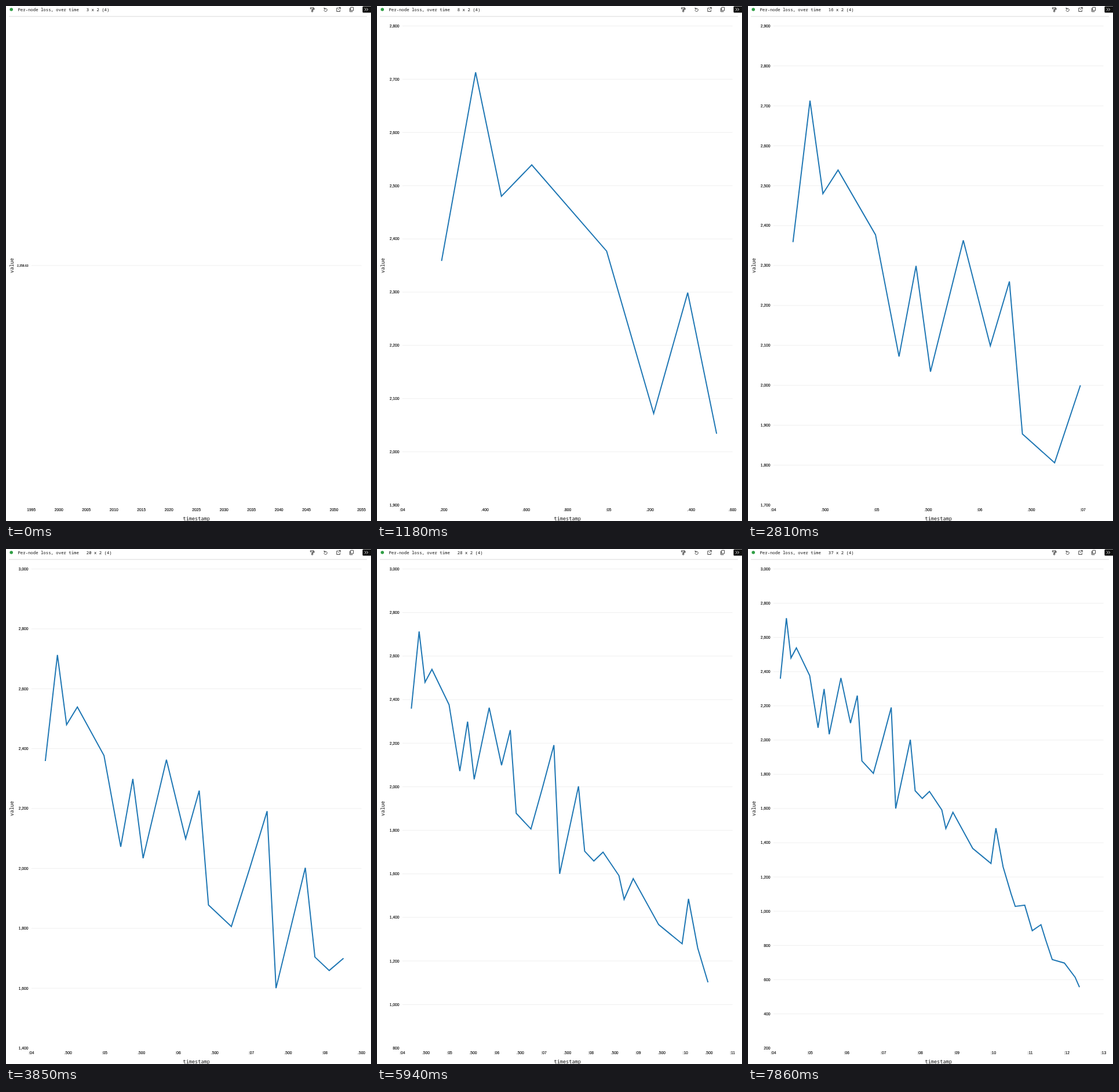
Recreate the animation shown at these times as an HTML page. Size 630x889 px, loop 8000 ms.

```html
<!DOCTYPE html>
<html lang="en">
<head>
<meta charset="utf-8">
<title>Per-node loss</title>
<style>
  html, body { margin: 0; width: 100%; height: 100%; overflow: hidden; background: #fff; }
  svg { display: block; }
  .mono { font-family: "Noto Sans Mono", "Liberation Mono", monospace; fill: #111; white-space: pre; }
  .tick { font: 6.7px "Liberation Sans", Arial, sans-serif; fill: #000; stroke: #000; stroke-width: .12; }
  .icon { fill: none; stroke: #222; stroke-width: .85; stroke-linejoin: round; stroke-linecap: round; }
</style>
</head>
<body>
<svg width="630" height="889" viewBox="0 0 630 889">
  <rect width="630" height="889" fill="#fff"/>
  <circle cx="9.2" cy="6" r="2.8" fill="#2f9e44"/>
  <text class="mono" font-size="7.33" x="20.4" y="8.8">Per-node loss, over time</text>
  <text class="mono" font-size="7.33" x="138.8" y="8.8" id="rows"></text>
  <path d="M5 18H623" stroke="#d9d9d9" stroke-width="1"/>
  <g class="icon">
    <path d="M525.8 2.8h5v2.2h-5zM530.8 3.8h1.2v2.4h-3.2v1.2M528 7.4h1.6v2.6h-1.6z"/>
    <path d="M549.2 3v2.2h2.2M549.4 5.1a2.7 2.7 0 1 1-.5 2.3"/>
    <path d="M573 3.6h-2.2v5.9h5.6v-2.3M574.4 2.5h2.8v2.8M577 2.7l-3.6 3.6"/>
    <path d="M595.2 2.3h4.4v5.6h-4.4zM593.4 4v5.8h4.6"/>
  </g>
  <path d="M630 .5H617a1.6 1.6 0 0 0-1.6 1.6v7.8a1.6 1.6 0 0 0 1.6 1.6H630z" fill="#111"/>
  <path d="M619 3.6l2.4 2.4-2.4 2.4M622.3 3.6l2.4 2.4-2.4 2.4" fill="none" stroke="#fff" stroke-width=".9"/>
  <g id="axes"></g>
  <path id="line" fill="none" stroke="#1f77b4" stroke-width="2"/>
  <text class="mono" font-size="8.6" text-anchor="middle" transform="translate(13.2 448) rotate(-90)">value</text>
  <text class="mono" font-size="8.6" text-anchor="middle" x="328.7" y="888">timestamp</text>
</svg>
<script>
const LOOP = 8;
const LEFT = 43.8, RIGHT = 613.6, TOP = 34.5, BOTTOM = 861.5;

// The stream runs LEAD seconds ahead; the chart redraws every REDRAW seconds.
const LEAD = .56, REDRAW = .31, FIRST = .045;

// seconds after :04, value
const data = [
  [.19, 2358.63], [.355, 2713], [.48, 2480], [.627, 2539], [.99, 2377],
  [1.218, 2072], [1.383, 2299], [1.523, 2034], [1.841, 2363], [2.103, 2099],
  [2.288, 2260], [2.414, 1878], [2.726, 1806], [2.976, 2000], [3.213, 2191],
  [3.335, 1600], [3.734, 2002], [3.865, 1704], [4.06, 1659], [4.255, 1700],
  [4.592, 1592], [4.702, 1483], [4.895, 1578], [5.434, 1367], [5.932, 1279],
  [6.067, 1485], [6.263, 1259], [6.48, 1102], [6.594, 1028], [6.853, 1035],
  [7.058, 886], [7.295, 921], [7.429, 829], [7.603, 717], [7.934, 697],
  [8.226, 614], [8.345, 556]
];

const rowsEl = document.getElementById("rows");
const axesEl = document.getElementById("axes");
const lineEl = document.getElementById("line");

const rowsAt = t => data.filter(p => p[0] <= t + LEAD).length;

function plottedAt(t) {
  const k = Math.floor((t - FIRST) / REDRAW);
  return k < 0 ? 1 : rowsAt(FIRST + k * REDRAW);
}

function niceStep(span, count) {
  const raw = span / count;
  const power = 10 ** Math.floor(Math.log10(raw));
  const e = raw / power;
  return power * (e >= Math.sqrt(50) ? 10 : e >= Math.sqrt(10) ? 5 : e >= Math.SQRT2 ? 2 : 1);
}

const widen = ([lo, hi], step) =>
  [Math.floor(lo / step + 1e-6) * step, Math.ceil(hi / step - 1e-6) * step];

function padded(values, part) {
  const lo = Math.min(...values), hi = Math.max(...values), pad = (hi - lo) * part;
  return [lo - pad, hi + pad];
}

function timeDomain(values) {
  const d = padded(values, .01);
  return widen(d, niceStep(d[1] - d[0], 9.3));
}

function valueDomain(values) {
  let d = padded(values, .1), last = 0;
  for (let i = 0; i < 10; i++) {
    const step = niceStep(d[1] - d[0], 10);
    if (step === last) break;
    d = widen(d, step);
    last = step;
  }
  return d;
}

function ticks([lo, hi]) {
  const step = niceStep(hi - lo, 10), out = [];
  for (let i = Math.ceil(lo / step - 1e-6); i * step <= hi + step * 1e-6; i++) out.push(i * step);
  return out;
}

const scale = ([lo, hi], a, b) => v => a + (v - lo) / (hi - lo) * (b - a);

function timeLabel(s) {
  const ms = Math.round(s * 1000), part = ms % 1000;
  return part ? "." + String(part).padStart(3, "0")
              : ":" + String(4 + ms / 1000).padStart(2, "0");
}

const valueLabel = v => String(Math.round(v)).replace(/\B(?=(\d{3})+$)/g, ",");

const xTick = (x, label) =>
  `<text class="tick" text-anchor="middle" x="${x}" y="872">${label}</text>`;

const yTick = (y, label, size = 6.7) =>
  (y < BOTTOM - 1 ? `<path d="M${LEFT} ${y}H${RIGHT}" stroke="#ebebeb" stroke-width=".8"/>` : "") +
  `<text class="tick" style="font-size:${size}px" text-anchor="end" x="38.5" y="${y + size * .355}">${label}</text>`;

function plot(count) {
  if (count === 1) {
    const sx = scale([1995, 2055], LEFT, RIGHT);
    let out = yTick((TOP + BOTTOM) / 2, "2,358.63", 5);
    for (let year = 1995; year <= 2055; year += 5) out += xTick(sx(year), year);
    axesEl.innerHTML = out;
    lineEl.setAttribute("d", "");
    return;
  }
  const pts = data.slice(0, count);
  const xd = timeDomain(pts.map(p => p[0])), yd = valueDomain(pts.map(p => p[1]));
  const sx = scale(xd, LEFT, RIGHT), sy = scale(yd, BOTTOM, TOP);
  axesEl.innerHTML =
    ticks(yd).map(v => yTick(sy(v), valueLabel(v))).join("") +
    ticks(xd).map(s => xTick(sx(s), timeLabel(s))).join("");
  lineEl.setAttribute("d", "M" + pts.map(([s, v]) => sx(s).toFixed(2) + " " + sy(v).toFixed(2)).join("L"));
}

let plotted = 0;

function render(t) {
  rowsEl.textContent = `${rowsAt(t)} x 2 (4)`;
  const count = plottedAt(t);
  if (count !== plotted) plot(plotted = count);
}

const start = performance.now();
function tick() {
  render((performance.now() - start) / 1000 % LOOP);
  requestAnimationFrame(tick);
}
render(0);
requestAnimationFrame(tick);
</script>
</body>
</html>
```
